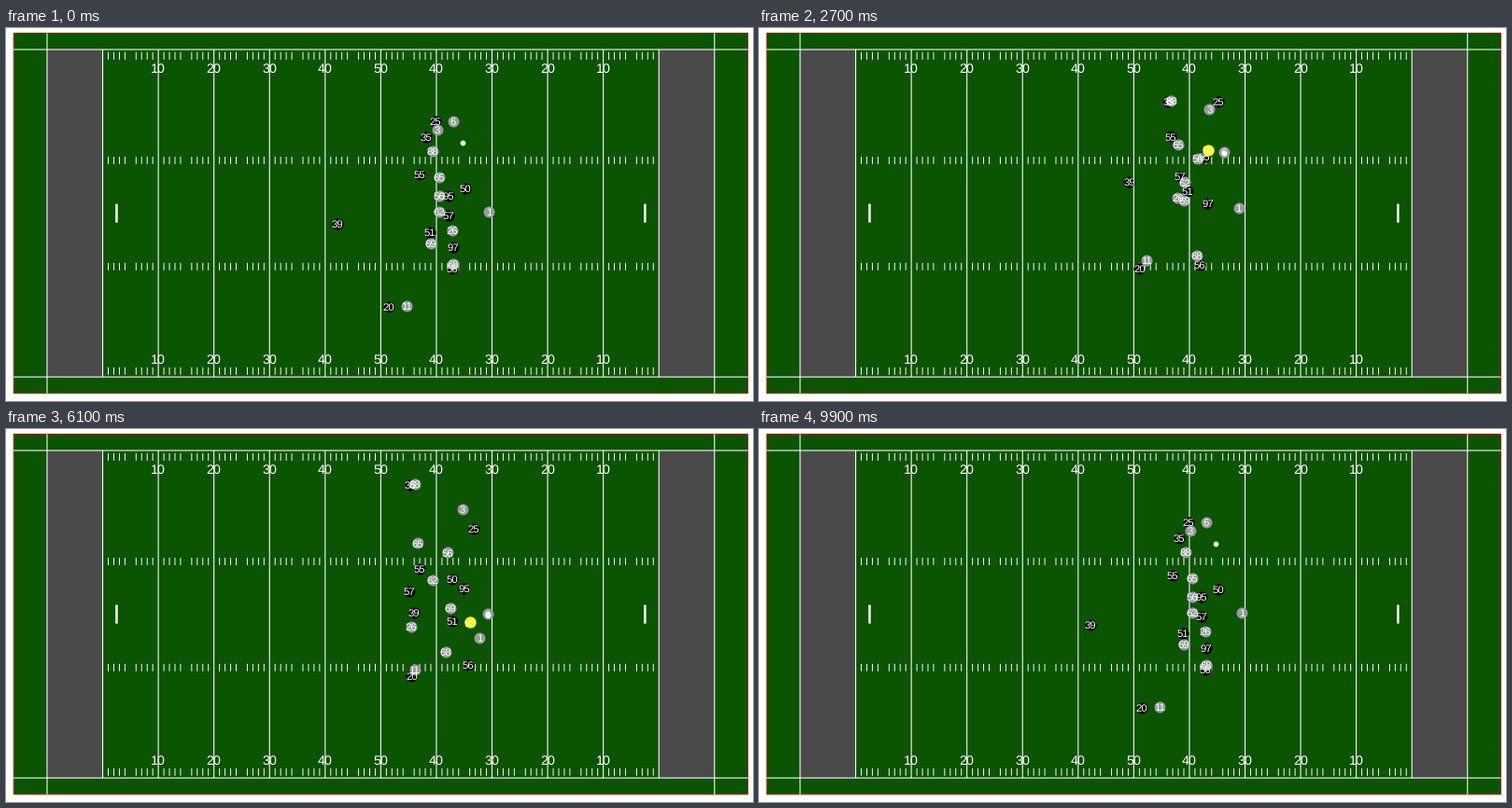
A matplotlib script for the animation above (10 s loop, 800x400 px).

```python
import numpy as np
import matplotlib.pyplot as plt
from matplotlib.animation import FuncAnimation
from matplotlib.patches import Rectangle

plt.rcParams["text.hinting"] = "no_hinting"

PX = 0.72  # points per pixel at 100 dpi
FRAMES, INTERVAL = 100, 100
GREEN, GREY, SILVER = "#0b5402", "#4a4a4a", "#969b9e"

# Panel edges; the field fills it with 5 % padding on every side.
LEFT, RIGHT, TOP, BOTTOM = 8.25, 794.5, 5.5, 391.75
YARD_X = (RIGHT - LEFT) / 132
YARD_Y = (BOTTOM - TOP) / (1.1 * 53.3)
MID_X, MID_Y = (LEFT + RIGHT) / 2, (TOP + BOTTOM) / 2
SIDE_TOP, SIDE_BOTTOM = MID_Y - 26.65 * YARD_Y, MID_Y + 26.65 * YARD_Y

# Ticks are tenths of a second of play.
CATCH_TICK, TACKLE_TICK, LAST_TICK = 6, 64, 74

# Each player: where he starts, where he is at the tackle, how far he bows out.
DEFENSE = {
    25: [(460, 100), (493, 151), (24, -41)],
    35: [(450, 117), (433, 61), (-7, -23)],
    55: [(443, 157), (446, 213), (-3, -65)],
    50: [(492, 172), (481, 219), (-9, -62)],
    95: [(474, 180), (505, 234), (-8, -66)],
    57: [(474, 201), (425, 216), (-9, -52)],
    39: [(355, 210), (459, 260), (10, -68)],
    51: [(454, 219), (496, 267), (-9, -66)],
    97: [(479, 235), (515, 258), (-11, -61)],
    56: [(478, 258), (525, 254), (-23, -3)],
    20: [(410, 299), (467, 298), (-23, -46)],
}
OFFENSE = {
    6: [(479, 100), (525, 254), (5, -17)],
    3: [(462, 109), (484, 98), (15, -21)],
    88: [(457, 132), (444, 69), (-13, -38)],
    65: [(464, 160), (441, 141), (-9, -33)],
    56: [(464, 180), (472, 148), (4, -34)],
    62: [(464, 197), (463, 176), (-9, -28)],
    1: [(517, 197), (501, 262), (2, -27)],
    26: [(478, 217), (435, 266), (-18, -56)],
    69: [(455, 231), (499, 227), (-15, -50)],
    68: [(479, 253), (479, 240), (-11, -6)],
    11: [(429, 298), (471, 297), (-30, -55)],
}
SNAP_BALL = np.array([488.5, 123])


def positions(team, t):
    """Straight run plus a shared bow; everyone slows down after the tackle."""
    start, end, bow = np.array(list(team.values()), float).transpose(1, 0, 2)
    late = max(t - TACKLE_TICK, 0)
    u = (t - late * late / 30) / TACKLE_TICK
    return start + (end - start) * u + bow * np.sin(np.pi * u ** 0.9)


def tick_of(frame):
    last_moving = FRAMES - 2
    return round(frame * LAST_TICK / last_moving) if frame <= last_moving else 0


fig = plt.figure(figsize=(8, 4), dpi=100, facecolor="white")
ax = fig.add_axes([0, 0, 1, 1])
ax.set(xlim=(0, 800), ylim=(400, 0))
ax.axis("off")


def rect(x0, y0, x1, y1, **style):
    ax.add_patch(Rectangle((x0, y0), x1 - x0, y1 - y0, lw=1.07 * PX,
                           zorder=0, snap=False, **style))


def vlines(xs, y0, y1, width=1.07):
    ax.vlines(xs, y0, y1, colors="white", lw=width * PX, zorder=1, snap=False)


def label(text, x, y, size, z):
    return ax.text(x, y + 0.35 * size, text, fontsize=size * PX, color="white",
                   family="Liberation Sans", ha="center", va="baseline", zorder=z)


def yard(n):
    return MID_X + YARD_X * (n - 60)


def draw_field():
    rect(LEFT, TOP, RIGHT, BOTTOM, fc=GREEN, ec="#a3260f")
    for start in (0, 110):
        rect(yard(start), SIDE_TOP, yard(start + 10), SIDE_BOTTOM, fc=GREY, ec="none")
    ax.hlines([SIDE_TOP, SIDE_BOTTOM], LEFT, RIGHT, colors="white",
              lw=1.07 * PX, zorder=1, snap=False)
    vlines([yard(0), yard(120)], TOP, BOTTOM)
    vlines([yard(n) for n in range(10, 111, 10)], SIDE_TOP, SIDE_BOTTOM)
    hashes = [yard(n) for n in range(11, 110) if n % 5]
    for offset in (-169, -56.9, 56.9, 169):
        y = MID_Y + 0.3 + offset
        vlines(hashes, y - 4, y + 4, 0.95)
    vlines([yard(12.5), yard(107.5)], MID_Y - 10, MID_Y + 10, 2.5)
    for n in range(20, 101, 10):
        for y in (43, 355):
            label(str(50 - abs(n - 60)), yard(n), y, 14.2, 2)


def dots(color, radius, z):
    return ax.plot([], [], "o", color=color, ms=2 * radius * PX, mew=0,
                   zorder=z, snap=False)[0]


draw_field()
def_dots = dots("black", 6, 3)
off_dots = dots(SILVER, 6, 4)
near_dot = dots("yellow", 6.2, 5)
ball_dot = dots("white", 2.9, 7)
NUM = 11.4
numbers = [label(str(n), 0, 0, NUM, 6) for n in (*DEFENSE, *OFFENSE)]


def update(frame):
    t = tick_of(frame)
    defense, offense = positions(DEFENSE, t), positions(OFFENSE, t)
    carrier = offense[0]
    w = min(t / CATCH_TICK, 1)
    ball = SNAP_BALL * (1 - w) + (carrier + (0, 1)) * w

    def_dots.set_data(*defense.T)
    off_dots.set_data(*offense.T)
    ball_dot.set_data([ball[0]], [ball[1]])

    # Highlight the defender closest to the ball carrier.
    gap = np.hypot(*((defense - carrier) / (YARD_X, YARD_Y)).T)
    near = defense[gap.argmin()]
    near_dot.set_data([near[0]], [near[1]])
    near_dot.set_visible(t >= CATCH_TICK - 1)

    for txt, (x, y) in zip(numbers, np.vstack([defense, offense])):
        txt.set_position((x, y + 0.35 * NUM))
    return [def_dots, off_dots, near_dot, ball_dot, *numbers]


anim = FuncAnimation(fig, update, frames=FRAMES, interval=INTERVAL,
                     repeat=True, repeat_delay=0, blit=False)
plt.show()
```
